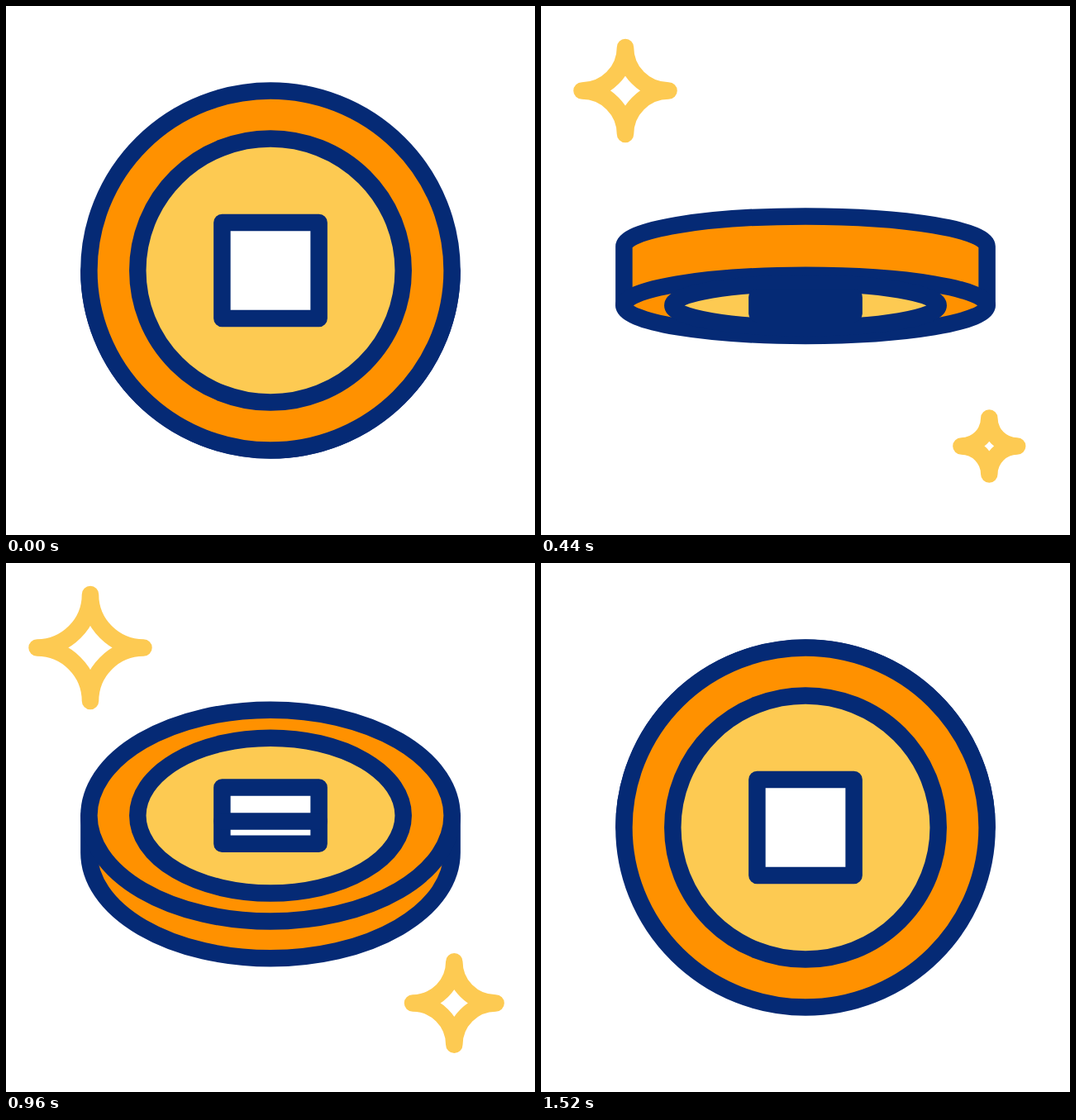
Recreate the animation shown at these times as an HTML page. Size 640 by 640 pixels, loop 1900 ms.

```html
<!DOCTYPE html>
<html lang="en">
<head>
<meta charset="utf-8">
<title>Spinning coin</title>
<style>
  html, body { margin: 0; width: 100%; height: 100%; overflow: hidden; background: #fff; }
  svg { display: block; width: 100vw; height: 100vh; }
  .line { stroke: #052a75; stroke-width: 20.5; stroke-linejoin: round; stroke-linecap: round; }
  .orange { fill: #ff9100; }
  .yellow { fill: #fdca52; }
  .hole { fill: #fff; }
  .star { fill: none; stroke: #fdca52; stroke-width: 20.5; stroke-linejoin: round; }
</style>
</head>
<body>
<svg viewBox="0 0 640 640">
  <path id="body" class="line orange"/>
  <ellipse id="rim" class="line orange" cx="320" rx="219.6"/>
  <ellipse id="disc" class="line yellow" cx="320" rx="160.7"/>
  <rect id="hole" class="line hole" x="261.4" width="117.2"/>
  <path id="bar" class="line"/>
  <path id="starA" class="star" transform="translate(102 102.5)"/>
  <path id="starB" class="star" transform="translate(542.3 532.5)"/>
</svg>
<script>
const LOOP = 1900, STEP = 20, END = 1520;
const RIM = 217.5, DISC = 159.6, HOLE = 58;
const HIGH = 284.7, LOW = 367.4;   // centres of the two faces when edge-on
const STAR_DELAY = 260;

// Quarter turns: flat-on time, edge-on time, end, flat-on centre, face is upper
const turns = [
  { flat: 0, edge: 375, end: 380, base: 320, up: true },
  { flat: 783, edge: 386, end: 783, base: 330.3, up: false },
  { flat: 783, edge: 1110, end: 1098, base: 330.3, up: true, bar: true },
  { flat: END, edge: 1085, end: LOOP, base: 320, up: false }
];

// Star size: time, radius
const sizes = [[92, 0], [266, 67], [467, 50.3], [718, 50.3], [1003, 67]];
const STAR_END = 1250;

const $ = id => document.getElementById(id);
const set = (id, attrs) => {
  for (const k in attrs) $(id).setAttribute(k, attrs[k]);
};
const clamp = (v, a, b) => Math.min(b, Math.max(a, v));
const mix = (a, b, u) => a + (b - a) * u;

// Cubic Bezier (1/3, 0, 5/6, 5/6): soft start, straight finish
function ease(x) {
  let a = 0, b = 1;
  for (let i = 0; i < 24; i++) {
    const s = (a + b) / 2, q = 1 - s;
    if (q * q * s + 2.5 * q * s * s + s ** 3 < x) a = s; else b = s;
  }
  return 2.5 * (1 - a) * a * a + a ** 3;
}

function drawCoin(t) {
  const turn = turns.find(k => t < k.end);
  const x = clamp((t - turn.flat) / (turn.edge - turn.flat), 0, 1);
  const c = Math.max(0.003, 1 - ease(x));
  const high = mix(turn.base, HIGH, x), low = mix(turn.base, LOW, x);
  const face = turn.up ? high : low, back = turn.up ? low : high;
  const h = HOLE * c;

  set("body", {
    d: `M100.4 ${face}V${back}A219.6 ${RIM * c} 0 0 ${turn.up ? 0 : 1} 539.6 ${back}V${face}Z`
  });
  set("rim", { cy: face, ry: RIM * c });
  set("disc", { cy: face, ry: DISC * c });
  set("hole", { y: face - h, height: 2 * h });

  // Far edge of the hole, seen through it
  const y = clamp(back - h - (low - high) * 0.085, face - h, face + h);
  set("bar", { d: turn.bar ? `M261.4 ${y}H378.6` : "" });
}

function starSize(t) {
  const [peak, top] = sizes[sizes.length - 1];
  if (t <= sizes[0][0] || t >= STAR_END) return 0;
  if (t >= peak) return top * (1 - ease((t - peak) / (STAR_END - peak)));
  const i = sizes.findIndex(k => t < k[0]);
  const [t0, r0] = sizes[i - 1], [t1, r1] = sizes[i];
  return mix(r0, r1, (t - t0) / (t1 - t0));
}

function drawStar(id, t) {
  const r = starSize(t), arc = `A${r} ${r} 0 0 0 `;
  set(id, {
    d: r ? `M0 ${-r}${arc}${r} 0${arc}0 ${r}${arc}${-r} 0${arc}0 ${-r}Z` : ""
  });
}

function draw(t) {
  drawCoin(t);
  drawStar("starA", t);
  drawStar("starB", t - STAR_DELAY);
}

const start = performance.now();
function tick() {
  const t = (performance.now() - start) % LOOP;
  draw(Math.min(END, Math.floor(t / STEP) * STEP));
  requestAnimationFrame(tick);
}
tick();
</script>
</body>
</html>
```
